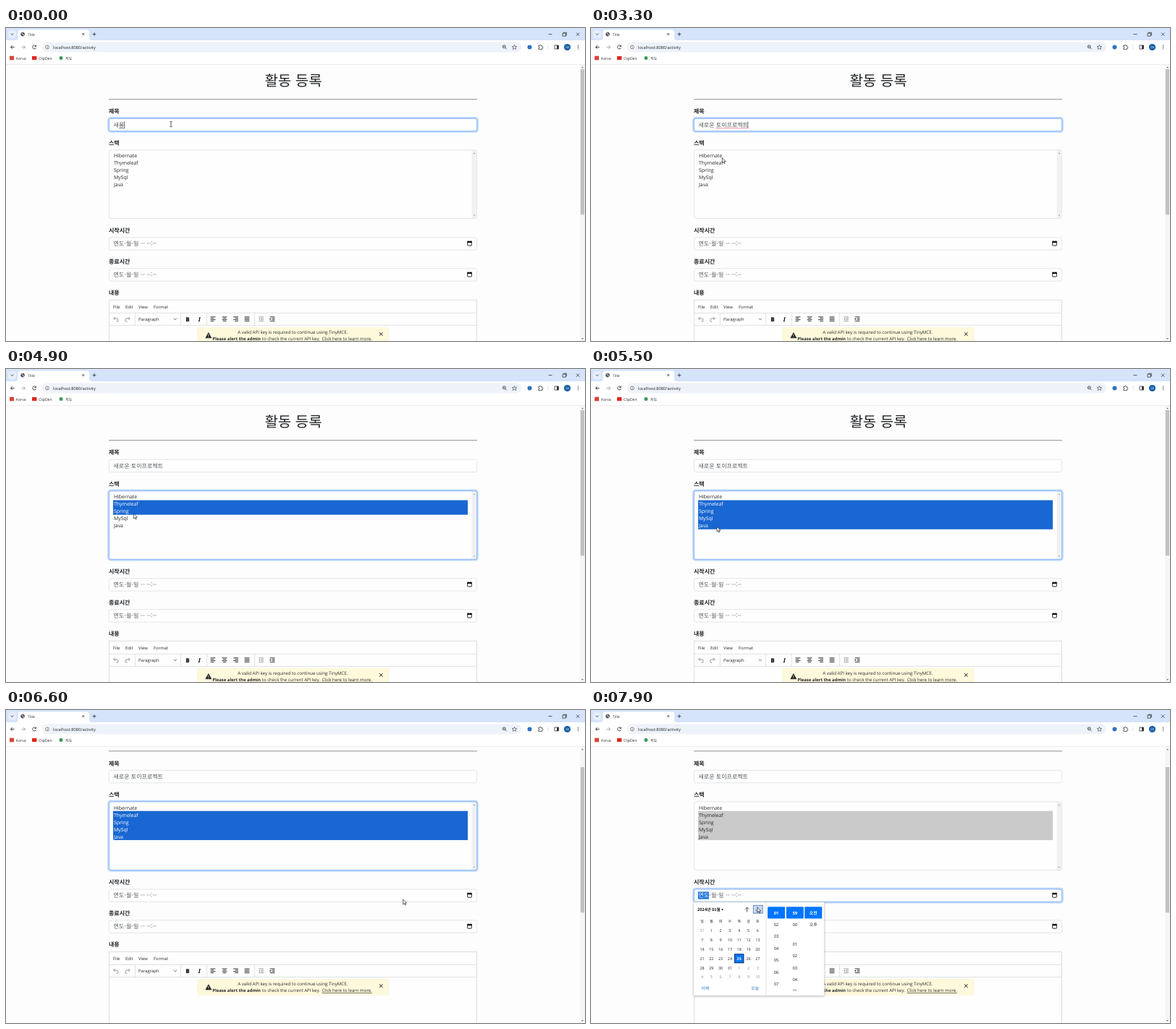
These frames come from a looping animation (800x433 px, 8 s). An HTML page:

```html
<!DOCTYPE html>
<html lang="ko">
<head>
<meta charset="utf-8">
<title>Title</title>
<style>
  html, body { margin: 0; width: 100%; height: 100%; overflow: hidden; background: #fdfdfd; }
  svg { display: block; width: 800px; height: 433px; }
  text { font-family: "Open Sans", "Noto Sans CJK KR", "Noto Sans CJK", sans-serif; text-rendering: geometricPrecision; white-space: pre; }
  .ko { font-family: "Noto Sans CJK KR", "Noto Sans CJK", sans-serif; }
</style>
</head>
<body>
<svg id="stage" viewBox="0 0 800 433" xmlns="http://www.w3.org/2000/svg"></svg>
<script>
const LOOP = 8000, STEP = 100;
const INK = '#24282c', GREY = '#54585c', LINE = '#dcdfe3';

// Drawing helpers: each returns SVG markup
const text = (x, y, size, str, fill = INK, more = '') =>
  `<text x="${x}" y="${y}" font-size="${size}" fill="${fill}" ${more}>${str}</text>`;
const ko = (x, y, size, str, fill = INK, more = '') => text(x, y, size, str, fill, `class="ko" ${more}`);
const mid = (x, y, size, str, fill, more = '') => text(x, y, size, str, fill, `text-anchor="middle" ${more}`);
const rect = (x, y, w, h, fill, more = '') =>
  `<rect x="${x}" y="${y}" width="${w}" height="${h}" fill="${fill}" ${more}/>`;
const line = (d, color = INK, w = 0.8, more = '') =>
  `<path d="${d}" fill="none" stroke="${color}" stroke-width="${w}" ${more}/>`;
const shape = (d, fill = INK, more = '') => `<path d="${d}" fill="${fill}" ${more}/>`;
const dot = (x, y, r, fill, more = '') => `<circle cx="${x}" cy="${y}" r="${r}" fill="${fill}" ${more}/>`;
const ring = (x, y, r, color = INK, w = 0.8) => dot(x, y, r, 'none', `stroke="${color}" stroke-width="${w}"`);
const group = (id, body, more = '') => `<g id="${id}" ${more}>${body}</g>`;

const BOLD = 'font-weight="700"';
const FIELD = { x: 142.4, w: 508.2 };
const field = (y, h) => rect(FIELD.x, y, FIELD.w, h, '#fefefe', `rx="2.5" stroke="${LINE}" stroke-width="0.8"`);
const focusRing = (id, y, h) => group(id,
  rect(FIELD.x - 1.1, y - 1.1, FIELD.w + 2.2, h + 2.2, 'none', 'rx="3.4" stroke="#0d6efd" stroke-opacity=".27" stroke-width="2.1"') +
  rect(FIELD.x, y, FIELD.w, h, 'none', 'rx="2.5" stroke="#86b7fe" stroke-width="0.9"'));

function browser() {
  const back = x => `M${x + 2.6} 26.5H${x - 2.5}M${x - 0.1} 24L${x - 2.6} 26.5L${x - 0.1} 29`;
  return rect(0, 0, 800, 50.5, '#fff') +
    rect(0, 0, 800, 17, '#d5e3fb') +
    rect(3, 3, 11, 11, '#e6eefc', 'rx="3.5"') + line('M6.6 7.7L8.5 9.5L10.4 7.7') +
    shape('M13 17Q16.500 17 16.500 13.500V6Q16.500 2.500 20 2.500H111.500Q115 2.500 115 6V13.500Q115 17 118.500 17Z', '#fff') +
    dot(23, 8.6, 2.8, '#50565d') + line('M21.200 7.200Q23 6.600 23.200 8.300T25 10', '#fff', 0.8) +
    text(30, 10.5, 4.9, 'Title') +
    line('M105.2 7L108.200 10M108.200 7L105.2 10') +
    line('M122 6.200V11M119.600 8.600H124.400') +
    line('M749.500 8.600H754.500', INK, 0.7) +
    line('M769 7.200H773.300V11.200H769ZM770.200 7V6.200H774.400V10H773.500', INK, 0.7) +
    line('M788 6.500L792.300 10.800M792.300 6.500L788 10.800', INK, 0.7) +
    line(back(9), '#33373b', 0.9) +
    line(back(-24), '#a2a6aa', 0.9, 'transform="scale(-1,1)"') +
    line('M41.200 25A2.500 2.500 0 1 0 41.500 27.300M41.500 23.700V25.500H39.600', '#33373b', 0.9) +
    rect(50, 19.5, 662, 14, '#eef2f9', 'rx="7"') +
    dot(57, 26.5, 4.4, '#fff') + ring(57, 26.5, 2.6, '#44484c', 0.7) + line('M57 26V28M57 24.800V25.400', '#44484c', 0.7) +
    text(65, 28.5, 5.7, 'localhost:8080/activity') +
    ring(688.3, 25.8, 2, '#33373b', 0.8) + line('M689.800 27.300L691.800 29.300M687.300 25.800H689.300', '#33373b', 0.8) +
    line('M702.500 23.400L703.400 25.500L705.700 25.700L704 27.200L704.500 29.400L702.500 28.200L700.500 29.400L701 27.200L699.300 25.700L701.600 25.500Z', '#44484c', 0.7) +
    dot(723.5, 26.5, 3, '#2f72c4') +
    line('M735.800 24.500H737.300Q737.400 23.200 738.300 23.200T739.300 24.500H740.800V26Q742 26.100 742 27T740.800 28V29.400H735.800V27.800Q737 27.700 737 26.900T735.800 26Z', '#33373b', 0.8) +
    line('M749 23.500V29.500', '#c3d3ee', 0.7) +
    line('M758 24H763.500V29H758Z', '#33373b', 0.8) + rect(761, 24, 2.7, 5, '#33373b') +
    dot(775.5, 26.5, 4.6, '#1760a5') + mid(775.5, 28, 4, '28', '#fff') +
    [24.2, 26.5, 28.8].map(y => dot(790.5, y, 0.65, '#33373b')).join('') +
    rect(5, 38.7, 6, 5.6, '#d9453a') + text(14, 43.5, 5.1, 'Korva') +
    rect(36, 39, 6.4, 5, '#e0261c') + text(45, 43.5, 5.1, 'ClipDen') +
    dot(76, 41.5, 2.5, '#3b9a5a') + ko(82, 43.5, 5.1, '지도') +
    rect(0, 50, 800, 0.6, '#dfe2e6');
}

const dateRow = y => field(y, 17.4) +
  ko(148.5, y + 11.4, 8, '연도', GREY) + ko(163.2, y + 11.4, 8, '-월-일', GREY) +
  ko(186, y + 11.4, 8, '-- --:--', GREY, 'letter-spacing=".14"') +
  rect(637.700, y + 5.700, 5.600, 5.600, 'none', 'stroke="#111" stroke-width="0.9" rx=".5"') +
  rect(637.300, y + 5.200, 6.400, 2.200, '#111') + line(`M638.700 ${y + 4.500}v1.500M642.300 ${y + 4.500}v1.500`, '#111', 0.8);

const alignIcon = (x, offsets) => line([[0, 6.8], [1, 4.6], [2, 6.8], [3, 4.6]].map(([i, w]) =>
  `M${x - 3.4 + (w < 5 ? offsets : 0)} ${399.7 + i * 1.9}h${offsets === null ? 6.8 : w}`).join(''), INK, 0.9);
const indentIcon = (x, color, dir) => line(
  `M${x - 3.4} 399.700h6.800M${x - 0.4} 401.600h3.800M${x - 0.4} 403.500h3.800M${x - 3.4} 405.400h6.800`, color, 0.9) +
  shape(dir > 0 ? `M${x - 3.4} 401v3.200l2-1.600z` : `M${x - 1.4} 401v3.200l-2-1.600z`, color);

function editor() {
  const sep = [178, 241, 277, 343].map(x => `M${x}.4 394.300V411`).join('');
  const menus = [[148, 'File'], [165, 'Edit'], [183, 'View'], [204, 'Format']];
  return rect(FIELD.x, 376.2, FIELD.w, 240, '#fefefe', 'stroke="#d6d6d6" stroke-width="0.8"') +
    menus.map(([x, s]) => text(x, 387.5, 5.95, s)).join('') +
    line(`M142.400 394.300H650.600M142.400 411.300H650.600${sep}`, '#d6d6d6', 0.7) +
    line('M150.500 399.800L148.700 401.800L150.500 403.700M148.900 401.800H153Q155.200 402 155 404.500T152.600 406', '#85898d', 0.9) +
    line('M169.300 399.800L171.100 401.800L169.300 403.700M170.900 401.800H166.800Q164.600 402 164.800 404.500T167.200 406', '#85898d', 0.9) +
    text(183, 405, 5.95, 'Paragraph') + line('M231.700 401.700L233.800 403.600L235.900 401.700', '#44484c', 0.8) +
    mid(251, 405.5, 8, 'B', '#111', 'font-weight="800"') + mid(267, 405.5, 8, 'I', '#111', 'font-style="italic" font-family="Noto Serif, serif" font-weight="700" style="font-family:Noto Serif,serif"') +
    alignIcon(286, 0) + alignIcon(302, 1.1) + alignIcon(317.5, 2.2) + alignIcon(333, null) +
    indentIcon(352.5, '#989b9f', -1) + indentIcon(368, INK, 1);
}

function notice() {
  return rect(264.5, 414.3, 264.5, 21.8, '#fff9dc', 'rx="1.5" stroke="#f6efcb" stroke-width="0.5"') +
    shape('M279.800 421.600L283.800 428.700H275.800Z', '#1e2328', 'stroke="#1e2328" stroke-width="0.7" stroke-linejoin="round"') +
    line('M279.800 423.900V426.400M279.800 427.200V428', '#fff9dc', 0.8) +
    text(320.2, 423.2, 6.15, 'A valid API key is required to continue using TinyMCE.') +
    text(285.2, 431.9, 5.95, 'Please alert the admin', INK, BOLD) +
    text(353.8, 431.9, 6.1, 'to check the current API key.') +
    text(436.5, 431.9, 6.08, 'Click here to learn more.', INK, 'text-decoration="underline"') +
    line('M515.900 421.100L520.500 425.700M520.500 421.100L515.900 425.700', '#111', 1);
}

const STACK = ['Hibernate', 'Thymeleaf', 'Spring', 'MySql', 'Java'];
const ROW = 10.06;

function page() {
  const labels = [[118.4, '제목'], [161.9, '스택'], [282.9, '시작시간'], [325.9, '종료시간'], [368.9, '내용']];
  return ko(397, 79.8, 20, '활동 등록', '#1f2326', 'text-anchor="middle"') +
    rect(142, 98.2, 509, 0.95, '#8b8b8d') +
    labels.map(([y, s]) => ko(142, y, 8, s, '#1f2326', BOLD)).join('') +
    field(125.2, 17.4) + focusRing('titleRing', 125.2, 17.4) +
    '<text id="typed" class="ko" x="148.500" y="136.900" font-size="8" fill="#54585c"></text>' +
    rect(0, 138.6, 7, 0.6, '#444', 'id="compose"') +
    rect(0, 129.3, 0.6, 9.8, '#111', 'id="caret"') +
    line('M172.400 138.500H216.300', '#e2434b', 0.9, 'id="squiggle" stroke-dasharray="1.1 .8"') +
    field(168.7, 94.6) + rect(643.5, 169.2, 6.8, 93.6, '#f1f1f2') +
    shape('M645.700 174L647 172.400L648.300 174ZM645.700 258.500L647 260.100L648.300 258.500Z', '#8b8e92') +
    rect(148, 181.5, 490, 0, '#1967d2', 'id="pick"') +
    STACK.map((s, i) => text(149, (179.4 + i * 10).toFixed(1), 6.9, s, INK, 'data-option')).join('') +
    focusRing('stackRing', 168.7, 94.6) +
    dateRow(289.7) + dateRow(332.7) + focusRing('startRing', 289.7, 17.4) +
    group('yearPick', rect(148, 293.2, 14.9, 10.2, '#1a73d9') + ko(148.5, 301.1, 8, '연도', '#fff')) +
    editor() + notice();
}

function picker() {
  const BLUE = '#0075ff', colX = i => 153.5 + i * 12.8;
  let out = rect(141.8, 265.8, 180.5, 129.3, '#fff', 'rx="1.5" filter="url(#shadow)" stroke="#cfcfcf" stroke-width="0.5"') +
    ko(147, 278.3, 5.6, '2024년 01월', '#111', BOLD) + shape('M179.800 275.200H183.300L181.550 277.300Z') +
    line('M215.500 279.500V273M212.600 275.900L215.500 273L218.400 275.900', '#333', 0.8) +
    rect(224.3, 270.3, 12.8, 10.8, '#c9dcf5', 'id="hover" stroke="#4b7cb8" stroke-width="0.9"') +
    line('M230.500 272.800V279.200M227.600 276.300L230.500 279.200L233.400 276.300', '#333', 0.8);
  [...'일월화수목금토'].forEach((d, i) => out += mid(colX(i), 294, 5, d, '#222'));
  for (let i = 0; i < 42; i++) {
    const day = (i + 30) % 31 + 1, x = colX(i % 7), y = 307.4 + Math.floor(i / 7) * 12.8;
    const inside = i > 0 && i < 32, today = i === 25;
    if (today) out += rect(x - 6.2, y - 8, 12.4, 12, BLUE, 'stroke="#0b2b57" stroke-width="1"');
    out += mid(x, y, 5.4, day, today ? '#fff' : inside ? '#222' : '#8a8a8a', today ? BOLD : '');
  }
  out += ko(152.3, 387, 5.8, '삭제', '#1a6fc9') + ko(221.3, 387, 5.8, '오늘', '#1a6fc9') +
    line('M241.800 266V395', '#d0d0d0', 0.6);
  [256, 281.8, 307.2].forEach(x => out += rect(x - 12, 272.2, 24, 16.3, BLUE, 'rx="1"'));
  const pair = n => String(n).padStart(2, '0');
  const cell = (x, y, s, on) => mid(x, y, 5.9, s, on ? '#fff' : '#222', on ? BOLD : '');
  for (let i = 0; i < 7; i++) out += cell(256, 282.6 + i * 16.4, pair(i + 1), !i);
  out += cell(281.8, 282.6, '59', true) + cell(281.8, 299, '00');
  for (let i = 1; i < 6; i++) out += cell(281.8, 309.3 + i * 16.4, pair(i));
  out += cell(307.2, 282.6, '오전', true) + cell(307.2, 299, '오후');
  return out + rect(243, 388.3, 78, 6, '#fff');
}

const stage = document.getElementById('stage');
stage.innerHTML =
  '<defs><filter id="shadow" x="-5%" y="-5%" width="110%" height="112%"><feDropShadow dx="0" dy=".8" stdDeviation="1.2" flood-opacity=".35"/></filter></defs>' +
  rect(0, 0, 800, 433, '#fdfdfd') + group('page', page()) +
  rect(793.2, 50.5, 6.8, 383, '#f5f5f6') + rect(793.8, 57, 5.2, 201.3, '#c1c1c2', 'id="thumb"') +
  shape('M795 55.300L796.500 53.500L798 55.300ZM795 429L796.500 430.800L798 429Z', '#6b6e72') +
  browser() + group('picker', picker()) +
  group('beam', line('M-1.700 -3.600Q0 -3.600 0 -2.800Q0 -3.600 1.700 -3.600M0 -3V3M-1.700 3.600Q0 3.600 0 2.800Q0 3.600 1.700 3.600', '#222', 0.7)) +
  group('arrow', shape('M0 0V6.900L1.600 5.500L2.700 8L3.800 7.500L2.700 5.100H4.900Z', '#fff', 'stroke="#111" stroke-width="0.65" stroke-linejoin="round"'));

const ui = {};
stage.querySelectorAll('[id]').forEach(el => ui[el.id] = el);
const options = [...stage.querySelectorAll('[data-option]')];

// [time, value] tables
const TYPING = [[0, '새롱'], [100, '새로우'], [400, '새로운'], [800, '새로운 '], [900, '새로운 토'], [1000, '새로운 통'],
  [1100, '새로운 토이'], [1300, '새로운 토잎'], [1400, '새로운 토이프'], [1500, '새로운 토이플'], [1600, '새로운 토이프로'],
  [1700, '새로운 토이프롲'], [1800, '새로운 토이프로제'], [1900, '새로운 토이프로젝'], [2100, '새로운 토이프로젝트']];
const PICKED = [[0, 0], [4100, 1], [4700, 2], [5100, 3], [5500, 4]];
const SCROLL = [[6000, 0], [6100, 2.5], [6200, 19], [6300, 36.5], [6400, 41.8]];
const MOUSE = [[3000, 228, 133], [3100, 218, 147], [3200, 196, 168], [3300, 181.3, 179.5], [3900, 181, 188], [4200, 180.5, 188],
  [4600, 178.5, 190], [4700, 177.5, 196], [4900, 176.5, 200], [5000, 176.5, 200], [5100, 175.5, 207], [5300, 174.5, 214],
  [5400, 174.5, 214], [5500, 174, 218], [5600, 174, 219], [5900, 174, 219], [6000, 215, 224], [6300, 349.7, 237.7],
  [6700, 615, 270], [6800, 639.5, 268.5], [6900, 641.4, 258.3], [7300, 641.4, 258.3], [7800, 250, 277], [7900, 229.8, 273]];

const held = (table, t) => table.filter(row => row[0] <= t).pop()[1];
function tween(table, t, col = 1) {
  const i = table.findIndex(row => row[0] > t);
  if (i === 0) return table[0][col];
  if (i < 0) return table[table.length - 1][col];
  const a = table[i - 1], b = table[i];
  return a[col] + (b[col] - a[col]) * (t - a[0]) / (b[0] - a[0]);
}
const fade = (t, start) => {
  const p = Math.min(1, Math.max(0, (t - start) / 150));
  return p * p * (3 - 2 * p);
};
const show = (el, on) => el.style.display = on ? '' : 'none';
const place = (el, x, y) => el.setAttribute('transform', `translate(${x} ${y})`);

function draw(t) {
  const typed = held(TYPING, t), typing = t < 4100;
  const end = 148.5 + [...typed].reduce((w, c) => w + (c === ' ' ? 1.8 : 7.36), 0);
  ui.typed.textContent = typed;
  ui.caret.setAttribute('x', end);
  ui.compose.setAttribute('x', end - 7.2);
  show(ui.caret, typing);
  show(ui.compose, t < 2700 && !typed.endsWith(' '));
  show(ui.squiggle, t >= 2700 && typing);

  const picked = held(PICKED, t), blurred = t >= 7100;
  ui.pick.setAttribute('height', picked * ROW);
  ui.pick.setAttribute('fill', blurred ? '#cbcacb' : '#1967d2');
  options.forEach((el, i) => el.setAttribute('fill', i > 0 && i <= picked && !blurred ? '#fff' : INK));

  ui.titleRing.style.opacity = 1 - fade(t, 4120);
  ui.stackRing.style.opacity = fade(t, 4120) - fade(t, 7100);
  ui.startRing.style.opacity = fade(t, 7100);
  show(ui.yearPick, blurred);
  show(ui.picker, t >= 7300);
  show(ui.hover, t >= 7800);

  const scroll = tween(SCROLL, t);
  place(ui.page, 0, -scroll);
  place(ui.thumb, 0, scroll * 0.526);

  const x = tween(MOUSE, t, 1), y = tween(MOUSE, t, 2), inTitle = t < 3100;
  show(ui.beam, inTitle);
  show(ui.arrow, !inTitle);
  place(inTitle ? ui.beam : ui.arrow, x, y);
}

const start = performance.now();
function tick() {
  const t = (performance.now() - start) % LOOP;
  draw(Math.floor(t / STEP) * STEP);
  requestAnimationFrame(tick);
}
tick();
</script>
</body>
</html>
```
